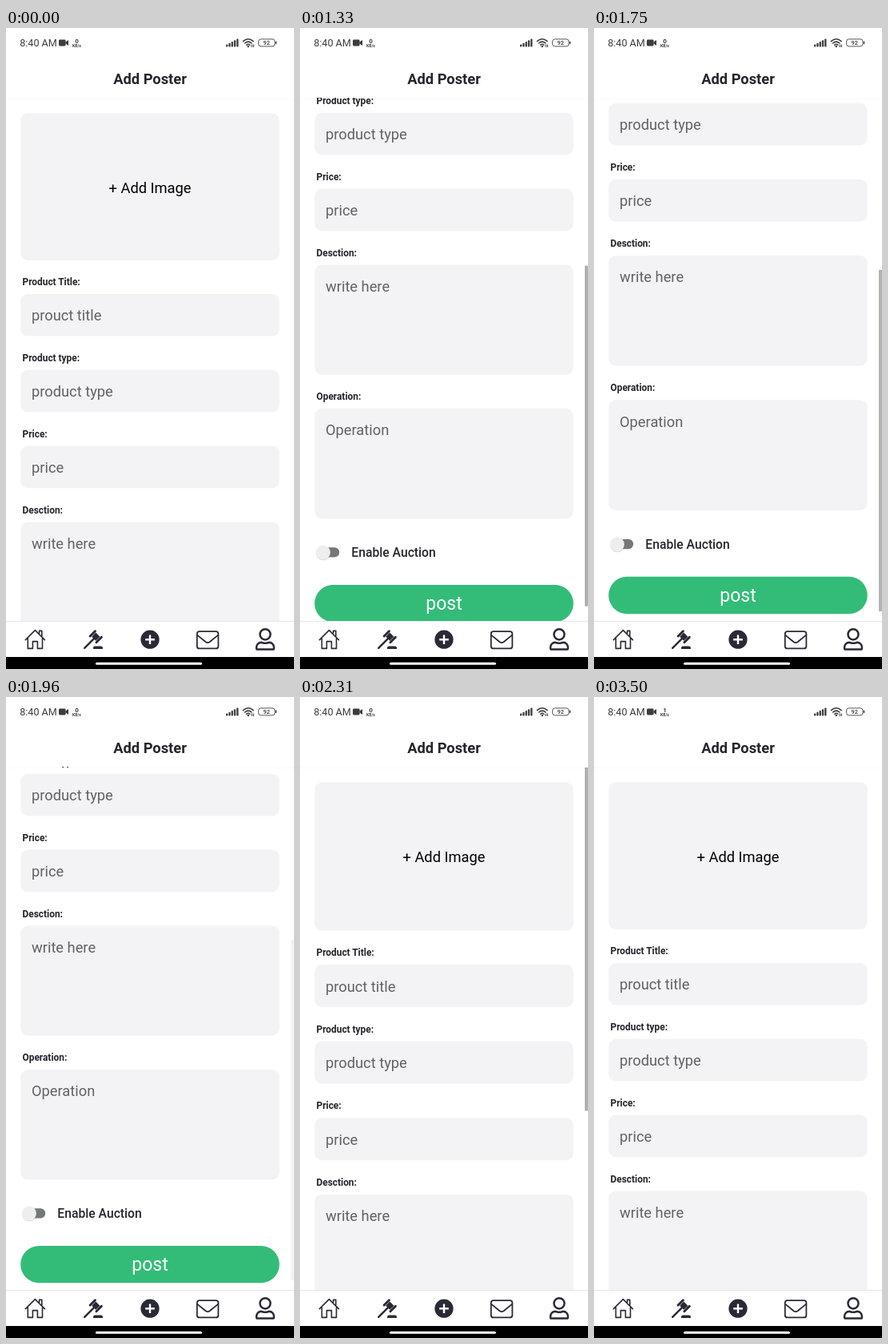
Animation of 360x800 px, one loop 3640 ms. Source, as an HTML page:

```html
<!DOCTYPE html>
<html lang="en">
<head>
<meta charset="utf-8">
<title>Add Poster</title>
<style>
  html, body { margin: 0; width: 100%; height: 100%; overflow: hidden; background: #fff; }
  svg { display: block; width: 100vw; height: 100vh; font-family: Roboto, sans-serif; }
  .label { font-size: 11.9px; font-weight: 700; fill: #25252d; }
  .hint { font-size: 18.3px; fill: #626264; }
  .box { fill: #f3f3f5; }
  .mid { text-anchor: middle; }
  .ink { fill: #2a2a37; }
  .line { fill: none; stroke: #2a2a37; stroke-linejoin: round; stroke-linecap: round; }
</style>
</head>
<body>
<svg viewBox="0 0 360 800">
  <defs><clipPath id="view"><rect y="87" width="360" height="653"/></clipPath></defs>
  <rect width="360" height="800" fill="#fff"/>
  <rect y="88" width="360" height="1" fill="#f9f9f9"/>

  <g clip-path="url(#view)">
    <g id="form">
      <rect class="box" x="18.2" y="106.3" width="323.6" height="183.7" rx="9.2"/>
      <text class="mid" x="180" y="205.5" font-size="18.3">+ Add Image</text>
      <g id="fields"></g>
      <rect x="24" y="969.3" width="25.2" height="12.2" rx="6.1" fill="#747876"/>
      <circle cx="29.2" cy="976.4" r="9.2" fill="#000" opacity=".13"/>
      <circle cx="29" cy="975.6" r="9" fill="#efeeef"/>
      <text x="64.3" y="981.3" font-size="15.7" font-weight="500" fill="#25252d">Enable Auction</text>
      <rect x="18.2" y="1016" width="323.6" height="46.2" rx="23.1" fill="#33bc78"/>
      <text class="mid" x="180" y="1047.3" font-size="23" fill="#fff">post</text>
    </g>
    <g id="bar"><rect x="356" y="88" width="4" height="425" fill="#b0b0b0"/></g>
  </g>

  <text class="mid" x="180" y="69.9" font-size="18.3" font-weight="700" fill="#25252d">Add Poster</text>

  <g fill="#3c3c3c">
    <text x="17.2" y="23" font-size="12.6">8:40 AM</text>
    <rect x="66" y="14.5" width="8.6" height="8" rx="1.4"/>
    <path d="M74.5 17.6L78 15V22L74.5 19.4Z"/>
    <text id="speed" class="mid" x="88.5" y="18.9" font-size="8" font-weight="700">0</text>
    <text class="mid" x="88.5" y="24.2" font-size="5" font-weight="700">KB/s</text>
    <g id="signal"></g>
    <path fill="none" stroke="#3c3c3c" stroke-width="1.5" stroke-linecap="round"
      d="M296.4 16.6Q302.8 10.9 309.2 16.6M298.6 19Q302.8 15.2 307 19M300.6 21.2Q302.8 19.3 305 21.2"/>
    <circle cx="302.8" cy="23" r="1.2"/>
    <path d="M307 20.4h1v3.6h-1zM309 20.4h1v3.6h-1z"/>
    <rect x="315.6" y="13.9" width="20.4" height="9" rx="3" fill="none" stroke="#555"/>
    <rect x="336.8" y="16.6" width="1.4" height="3.6" rx=".7"/>
    <text class="mid" x="325.8" y="21.1" font-size="7.4" font-weight="500">92</text>
  </g>

  <rect y="740" width="360" height="45" fill="#fff"/>
  <rect y="740" width="360" height="1" fill="#e6e6e8"/>
  <rect y="785" width="360" height="15"/>
  <rect x="112" y="791.7" width="133" height="3.1" rx="1.5" fill="#fff"/>

  <path class="line" stroke-width="1.6" d="M24.4 763.6L36.4 751.6L48.4 763.6M27.3 762V774.4H33.4V765.6H39.4V774.4H45.5V762M41.6 755.6V752.4H44.8V759.4"/>
  <g transform="translate(94.6 748.6) scale(1.2)">
    <path class="line" stroke-width="2.4" d="M8.8 8.7L14 3.4M15.3 15.1L20.6 9.8"/>
    <path class="line" stroke-width="2" d="M3 21L13 11"/>
    <path class="ink" d="M10.5 9.3L14.7 5L19 9.3L14.7 13.5ZM12 22V21A2 2 0 0 1 14 19H20A2 2 0 0 1 22 21V22Z"/>
  </g>
  <circle class="ink" cx="180" cy="763.2" r="11.6"/>
  <path d="M180 757.4V769M174.2 763.2H185.8" stroke="#fff" stroke-width="2.4"/>
  <rect class="line" x="238.8" y="753.2" width="26.6" height="21.2" rx="3" stroke-width="1.8"/>
  <path class="line" stroke-width="1.8" d="M239 757.6L249.6 766.2Q252.1 768 254.6 766.2L265.2 757.6"/>
  <g class="line" stroke-width="46" transform="translate(311.8 749) scale(.0545)">
    <circle cx="224" cy="144" r="120"/>
    <path d="M24 438C24 377 73 328 134 328C156 328 174 344 224 344C274 344 292 328 314 328C375 328 424 377 424 438V464A24 24 0 0 1 400 488H48A24 24 0 0 1 24 464Z"/>
  </g>
</svg>

<script>
const LOOP = 3640, TICK = 70, TOP = 88, BOTTOM = 740;
const MAX_SCROLL = 331, FLING = 1260, RETURN = 1960;
const $ = id => document.getElementById(id);
const clamp = v => Math.min(1, Math.max(0, v));

function add(parent, tag, attrs, text) {
  const el = document.createElementNS('http://www.w3.org/2000/svg', tag);
  for (const key in attrs) el.setAttribute(key, attrs[key]);
  if (text) el.textContent = text;
  parent.append(el);
}

let y = 332;
function field(label, hint, height = 52.6) {
  add($('fields'), 'text', { class: 'label', x: 20.5, y: y - 10.8 }, label);
  add($('fields'), 'rect', { class: 'box', x: 18.2, y, width: 323.6, height, rx: 9.2 });
  add($('fields'), 'text', { class: 'hint', x: 32, y: y + 33.3 }, hint);
  y += height + 42.2;
}
field('Product Title:', 'prouct title');
field('Product type:', 'product type');
field('Price:', 'price');
field('Desction:', 'write here', 137.4);
field('Operation:', 'Operation', 137.4);

for (let i = 0; i < 5; i++) {
  const height = 3 + i * 1.75;
  add($('signal'), 'rect', { x: 275 + i * 3.3, y: 23.6 - height, width: 2.3, height, rx: .8 });
}

// Fling down with a quick decay, then a steady drag back up.
function scrollAt(t) {
  if (t < FLING) return 0;
  if (t < RETURN) return MAX_SCROLL * (1 - Math.exp((FLING - t) / 20));
  return MAX_SCROLL * clamp(1 - (t - RETURN) / 152);
}

// Overscroll swells to 1% in 140 ms, then settles.
function stretchAt(t) {
  const x = (t - (t < RETURN ? 1400 : 2100)) / 140;
  return x > 0 && x < 4 ? 1 + .01 * (x * Math.exp(1 - x)) ** 2 : 1;
}

// The scrollbar fades out after each gesture.
function barOpacity(t) {
  return t <= FLING ? 0 : clamp(((t <= RETURN ? 2000 : 2940) - t) / 260);
}

function draw(ms) {
  const t = Math.floor(ms % LOOP / TICK) * TICK;
  const scroll = scrollAt(t), stretch = stretchAt(t);
  const anchor = t < RETURN ? BOTTOM : TOP;
  const move = dy => `translate(0 ${anchor}) scale(1 ${stretch}) translate(0 ${dy - anchor})`;
  $('form').setAttribute('transform', move(-scroll));
  $('bar').setAttribute('transform', move(scroll * .65));
  $('bar').setAttribute('opacity', barOpacity(t));
  $('speed').textContent = t >= 3500 ? '1' : '0';
}

const start = performance.now();
function tick() {
  draw(performance.now() - start);
  requestAnimationFrame(tick);
}
tick();
</script>
</body>
</html>
```
